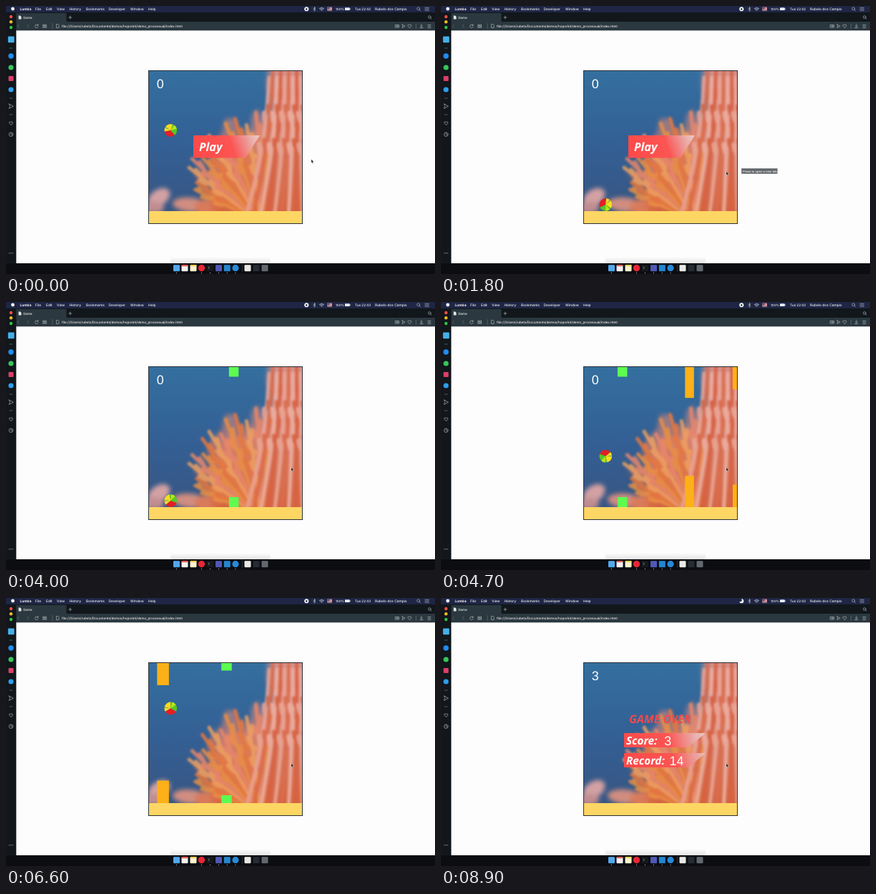
An HTML page that plays this animation: 600 by 375 pixels, repeating every 9 s.

```html
<!DOCTYPE html>
<html lang="en">
<head>
<meta charset="utf-8">
<title>Game</title>
<style>
html, body { margin: 0; width: 100%; height: 100%; overflow: hidden; background: #fdfdfd; }
svg { display: block; width: 600px; height: 375px; }
text { font-family: Inter, Roboto, sans-serif; font-weight: 500; text-rendering: geometricPrecision; white-space: pre; }
.num { font: 17.9px "Liberation Sans", Arial, sans-serif; fill: #fff; }
.label { font: italic 700 15.3px "Open Sans", "Noto Sans", sans-serif; fill: #fff; }
.line { fill: none; stroke: #a9b2b8; stroke-width: .7; stroke-linecap: round; stroke-linejoin: round; }
</style>
</head>
<body>
<svg id="stage" viewBox="0 0 600 375" xmlns="http://www.w3.org/2000/svg">
  <defs>
    <linearGradient id="sea" x2="0" y2="1">
      <stop stop-color="#346f9f"/><stop offset=".5" stop-color="#335f94"/><stop offset="1" stop-color="#39547f"/>
    </linearGradient>
    <linearGradient id="ribbon" x2="1" y2="-.12">
      <stop stop-color="#fe4b4a"/><stop offset=".52" stop-color="#fb5553"/>
      <stop offset=".8" stop-color="#eba5a5" stop-opacity=".92"/><stop offset="1" stop-color="#eadede" stop-opacity=".85"/>
    </linearGradient>
    <linearGradient id="haze" x2="0" y2="1">
      <stop stop-color="#000" stop-opacity="0"/><stop offset="1" stop-color="#000" stop-opacity=".1"/>
    </linearGradient>
    <linearGradient id="flesh" x2="0" y2="1">
      <stop stop-color="#d8958f"/><stop offset=".45" stop-color="#da8573"/><stop offset="1" stop-color="#d9653c"/>
    </linearGradient>
    <filter id="soft" x="-20%" y="-20%" width="140%" height="140%"><feGaussianBlur stdDeviation="3.2"/></filter>
    <filter id="mild" x="-10%" y="-10%" width="120%" height="120%"><feGaussianBlur stdDeviation="1.5"/></filter>
    <clipPath id="frame"><rect x="200" y="91" width="214" height="213"/></clipPath>
  </defs>
  <rect width="600" height="375" fill="#fdfdfd"/>
  <rect x="230" y="351" width="140" height="9" rx="3" fill="url(#haze)"/>
  <g id="chrome"></g>
  <g clip-path="url(#frame)">
    <rect x="200" y="90" width="215" height="215" fill="url(#sea)"/>
    <g id="photo"></g>
    <rect x="200" y="287" width="215" height="18" fill="#fed663"/>
    <text id="score" class="num" x="210.8" y="114.5"></text>
    <g id="blocks"></g>
    <g id="ball"></g>
  </g>
  <rect x="199.5" y="90.5" width="215" height="214" fill="none" stroke="#2c3038"/>
  <g id="play">
    <path d="M262 181H355L335 212.5H262Z" fill="url(#ribbon)"/>
    <text class="label" x="270" y="203" style="font-size:16.4px">Play</text>
  </g>
  <g id="over">
    <text class="label" x="263" y="174.5" style="font-size:15.8px;fill:#f04a4c">GAME OVER</text>
    <path d="M256 189H370L346 209H256ZM256 217H370L346 237H256Z" fill="url(#ribbon)"/>
    <text class="label" x="259" y="205">Score:</text>
    <text class="label" x="259" y="233">Record:</text>
    <text class="num" x="312.3" y="205.5">3</text>
    <text class="num" x="319.6" y="234">14</text>
  </g>
  <g id="tip">
    <rect x="420.3" y="227.3" width="50" height="7.4" fill="#62666a" stroke="#85898c" stroke-width=".5"/>
    <text x="422.3" y="232.6" font-size="4.15" fill="#fff">Press to open a new tab</text>
  </g>
  <path id="cursor" d="M0 0V5L1.1 4.1 1.9 6 2.8 5.6 2 3.8H3.5Z" fill="#111" stroke="#fff" stroke-width=".35"/>
</svg>
<script>
const $ = id => document.getElementById(id);
const rect = (x, y, w, h, fill, rx = 0) => `<rect x="${x}" y="${y}" width="${w}" height="${h}" rx="${rx}" fill="${fill}"/>`;
const disc = (x, y, r, fill) => `<circle cx="${x}" cy="${y}" r="${r}" fill="${fill}"/>`;
const line = (d, extra = '') => `<path class="line" d="${d}" ${extra}/>`;
const text = (x, y, s, size = 4.8, extra = '') => `<text x="${x}" y="${y}" font-size="${size}" fill="#f2f4f5" ${extra}>${s}</text>`;
const heart = (x, y) => line(`M${x} ${y + 2.4}L${x - 2.5} ${y - .2}C${x - 2.8} ${y - 2.6} ${x - .6} ${y - 2.6} ${x} ${y - 1}C${x + .6} ${y - 2.6} ${x + 2.8} ${y - 2.6} ${x + 2.5} ${y - .2}Z`);
const ring = (x, y, r) => `<circle class="line" cx="${x}" cy="${y}" r="${r}"/>`;

function drawMenu() {
  const items = [['File', 41], ['Edit', 56], ['View', 71], ['History', 88.5], ['Bookmarks', 112],
    ['Developer', 143.5], ['Window', 174], ['Help', 199]];
  const flag = rect(449.5, 1.7, 6.5, 4.8, '#e9e4e4') + [1.7, 3.4, 5.1].map(y => rect(449.5, y, 6.5, .9, '#c8434b')).join('') +
    rect(449.5, 1.7, 3, 2.6, '#3b4d8c');
  return rect(0, 0, 600, 9, '#1f2645') + disc(9.5, 4, 2.4, '#f2f2f2') +
    text(19.5, 5.8, 'Lumba', 4.8, 'style="font-weight:700"') +
    items.map(([s, x]) => text(x, 5.8, s)).join('') +
    disc(420.3, 4.3, 3, '#fff') + '<g id="rec"></g>' +
    line('M431.5 1.5V7M429.8 3L433 5.4 431.5 7M429.8 5.4L433 3 431.5 1.5') +
    line('M438.5 3.5Q441.5 1 444.5 3.5M439.7 5Q441.5 3.4 443.3 5M441.4 6.3H441.6', 'style="stroke:#fff"') + flag +
    text(461, 5.8, '100%', 4.4) + rect(474, 2.3, 6.8, 3.8, '#e9ecee', .7) + rect(481.1, 3.4, .7, 1.6, '#e9ecee') +
    '<text id="clock" x="488" y="5.8" font-size="4.6" fill="#f2f4f5"></text>' +
    text(516, 5.8, 'Rubelo dos Campis', 4.85) + ring(576.7, 3.7, 1.9) + line('M578.2 5.2L579.8 6.8') +
    line('M586 2.3H591.5M586 4.3H591.5M586 6.3H591.5');
}

function drawBars() {
  return rect(0, 9, 600, 13, '#11171b') + rect(14, 10, 70.5, 13, '#2b383f', 1) + rect(14, 22, 586, 12.3, '#2b383f') +
    rect(0, 9, 14.3, 351, '#12171b') +
    `<path d="M17.6 13.5H20L21.4 15V18.5H17.6Z" fill="#e5e9eb"/>` + text(24, 17.7, 'Game', 4.5) +
    line('M87.8 16H91.8M89.8 14V18') + ring(592.3, 15.5, 1.8) + line('M593.7 16.9L595 18.2') +
    line('M18 26L15.8 28 18 30M30 26L32.2 28 30 30', 'opacity=".45"') +
    line('M44.6 26.8A2.3 2.3 0 1 0 45 29M45 25.6V27.2H43.4') +
    line('M52 26.2H53.6V27.6H52ZM55 26.2H56.6V27.6H55ZM52 28.8H53.6V30.2H52ZM55 28.8H56.6V30.2H55Z') +
    line('M65 24.5V31.5M573.5 25V31.5', 'opacity=".45"') + line('M70.8 25.5H73L74 26.6V30.5H70.8Z') +
    text(78, 29.9, 'file:///Users/rubelo/Documents/demos/hoporbit/demo_processual/index.html', 4.55) +
    line('M544.7 26.5H549.7V30H544.7Z') + ring(547.2, 28.2, .9) +
    line('M554 25.8L558.3 28.2 554 30.5 554.8 28.2Z') + heart(564.4, 28.1) +
    line('M581 25.5V29M579.6 27.8L581 29.2 582.4 27.8M578.8 30.5H583.2M590 26.4H594M590 28.4H594M590 30.4H594');
}

function drawSide() {
  const dots = [[15, 2.2, '#fb4f49'], [22.3, 2.2, '#f8ba2f'], [30, 2.2, '#31c646'],
    [70, 3.7, '#258cf0'], [86, 3.6, '#38c65a'], [117, 3.6, '#2f9deb']];
  return dots.map(([y, r, c]) => disc(7, y, r, c)).join('') + rect(2.8, 42.5, 8.8, 8.8, '#45afe9', 1.2) +
    rect(3.5, 98, 7, 7, '#dc3e68', 1) + line('M5 59H9M5 129H9M5 152H9', 'opacity=".6"') +
    line('M4.3 137L10.3 140.3 4.3 143.5 5.4 140.3Z') + heart(7, 164) + ring(7, 179.7, 2.8) + line('M7 178V179.8L8.3 180.4') +
    [4.8, 7, 9.2].map(x => disc(x, 345.8, .6, '#c5cbd0')).join('');
}

function drawDock() {
  const squares = [[238.5, '#51a8ec'], [250, '#f1f1f2'], [262, '#fbf3cf'], [285.5, '#16191c'],
    [297.5, '#5059b5'], [309.3, '#2387cf'], [338, '#e9e9e4'], [350, '#252a33'], [362, '#62686d']];
  return rect(0, 360, 600, 15, '#0b0d11') +
    squares.map(([x, c]) => rect(x - 4.5, 362.2, 9, 9, c, 1.2)).join('') +
    disc(273.5, 366.7, 4.7, '#e62835') + disc(321, 366.7, 4.6, '#2789d8') +
    rect(246, 362.2, 8, 2, '#e34b48') + rect(258, 362.2, 8.5, 2, '#f4cc4d') + rect(330, 362, .5, 10, '#555') +
    line('M283 365L284.5 366.3 283 367.6') +
    [238.5, 273.5, 285.5, 297.5, 309.3, 321].map(x => disc(x, 373.5, .6, '#d4d7da')).join('');
}

// A curved coral arm with twigs on alternating sides.
function arm(x0, y0, x1, y1, bend, tone, width, twigs) {
  const mx = (x0 + x1) / 2 + bend, my = (y0 + y1) / 2;
  const a = Math.atan2(y1 - y0, x1 - x0);
  let d = `M${x0} ${y0}Q${mx} ${my} ${x1} ${y1}`;
  for (let k = 0; k < twigs; k++) {
    const u = .45 + .45 * k / twigs, v = 1 - u, b = a + (k % 2 ? .6 : -.6);
    const x = v * v * x0 + 2 * u * v * mx + u * u * x1, y = v * v * y0 + 2 * u * v * my + u * u * y1;
    d += `M${x} ${y}q${Math.cos(b) * 7} ${Math.sin(b) * 7} ${Math.cos(a + (b - a) / 2) * 15} ${Math.sin(a + (b - a) / 2) * 15}`;
  }
  return `<path d="${d}" stroke="${tone}" stroke-width="${width}"/>`;
}

function drawPhoto() {
  const fanTones = ['#e98f45', '#e5783f', '#efa060', '#e7876c'];
  const wallTones = ['#eca797', '#dd6c4b', '#efb1a2', '#d9603f'];
  let arms = '';
  for (let i = 0; i < 13; i++) {
    const u = i / 12, a = (208 + 66 * u) * Math.PI / 180;
    const len = 92 + 62 * Math.sqrt(u) - (i % 3 === 1 ? 14 : 0);
    arms += arm(346 + 12 * u, 296, 346 + 8 * u + Math.cos(a) * len, 300 + Math.sin(a) * len, -6 + 12 * u, fanTones[i % 4], 5, 4);
  }
  for (let i = 0; i < 10; i++) {
    arms += arm(335 + i * 10, 296, 368 + i * 5.5, i % 2 ? 86 : 100, 12 - i * 1.5, wallTones[i % 4], 5.2, 4);
  }
  const lumps = [[214, 268, 17, 11, -35, '#d3a1a3'], [207, 282, 14, 8, 0, '#c18d90'], [257, 278, 24, 10, 5, '#d08d80'], [284, 282, 20, 13, 0, '#d87a5c']]
    .map(([x, y, rx, ry, r, c]) => `<ellipse cx="${x}" cy="${y}" rx="${rx}" ry="${ry}" transform="rotate(${r} ${x} ${y})" fill="${c}"/>`).join('');
  const reef = 'M366 86H420V292H288L284 258 262 236 286 229 281 208 289 190 302 178 306 158 320 157 328 176 341 172 344 152 352 144 361 160 370 138 364 110Z';
  const core = 'M374 86H420V292H294L288 246 296 208 312 184 330 190 346 176 358 176 374 148Z';
  return `<g filter="url(#soft)">${lumps}<path d="${reef}" fill="url(#flesh)" opacity=".6"/><path d="${core}" fill="url(#flesh)" opacity=".9"/></g>` +
    `<g filter="url(#mild)" fill="none" stroke-linecap="round" opacity=".85">${arms}</g>`;
}

function drawBall() {
  const wedge = (from, to, fill) => {
    const p = a => `${8.8 * Math.cos(a * Math.PI / 180)} ${8.8 * Math.sin(a * Math.PI / 180)}`;
    return `<path d="M0 0L${p(from)}A8.8 8.8 0 0 1 ${p(to)}Z" fill="${fill}"/>`;
  };
  return wedge(-60, 60, '#e21f25') + wedge(60, 180, '#f7dd1b') + wedge(180, 300, '#55c722') +
    wedge(94, 104, '#6f9f70') + wedge(195, 235, '#b9e51f');
}

$('chrome').innerHTML = drawMenu() + drawBars() + drawSide() + drawDock();
$('photo').innerHTML = drawPhoto();
$('ball').innerHTML = drawBall();

const LOOP = 9000, STEP = 100, START = 2900, CRASH = 7430;
const FLOOR = 278, GRAVITY = 2062, LIFT = -507;
const jumps = [4450, 4800, 5500, 5771, 6230, 6963];
const spins = [[0, 110], [1800, 575], [3200, 955], [4700, 1340], [5800, 1650], [7500, 2160], [9000, 2590]];
const path = [[200, 427, 214.5], [1100, 399, 231.5]];
// colour, left edge, at time, px per ms, width, height
const blocks = [
  ['#5dfb50', 386, 3200, .0927, 13.5, 14],
  ['#fdb017', 341.3, 4700, .103, 12.5, 43.7],
  ['#fdb017', 408, 4700, .1035, 16.5, 31.5],
  ['#5dfb50', 384, 5800, .1035, 14.5, 11]
];

function lerp(keys, t, col = 1) {
  if (t <= keys[0][0]) return keys[0][col];
  for (let i = 1; i < keys.length; i++) {
    const a = keys[i - 1], b = keys[i];
    if (t <= b[0]) return a[col] + (b[col] - a[col]) * (t - a[0]) / (b[0] - a[0]);
  }
  return keys[keys.length - 1][col];
}

function ballY(t, n = jumps.filter(j => j <= t).length) {
  const s = (t - (n ? jumps[n - 1] : 0)) / 1000;
  const from = n ? ballY(jumps[n - 1], n - 1) : 174;
  const y = from + (n ? LIFT : 485) * s + GRAVITY * s * s / 2;
  return t > CRASH ? y : Math.min(FLOOR, y);
}

const show = (id, on) => $(id).setAttribute('visibility', on ? 'visible' : 'hidden');

function render(t) {
  const playing = t >= START && t < CRASH;
  let score = 0, bars = '';
  for (const [fill, x0, at, speed, w, h] of blocks) {
    const x = x0 - (Math.min(t, CRASH) - at) * speed;
    if (x <= 200) score++;
    if (playing && x < 415 && x > 200 - w) bars += rect(x, 90.5, w, h, fill) + rect(x, 287 - h, w, h, fill);
  }
  $('blocks').innerHTML = bars;
  $('score').textContent = score;
  $('ball').setAttribute('transform', `translate(230.3 ${Math.min(ballY(t), 330)}) rotate(${lerp(spins, t)})`);
  $('cursor').setAttribute('transform', `translate(${lerp(path, t)} ${lerp(path, t, 2)})`);
  $('clock').textContent = t < 4000 ? 'Tue 22:02' : 'Tue 22:03';
  $('rec').innerHTML = t < 8900 ? rect(419.2, 3.2, 2.2, 2.2, '#111', .4) : disc(418.6, 3, 2.2, '#1f2645');
  show('play', t < START);
  show('over', t >= CRASH);
  show('tip', t >= 1500 && t < 2300);
}

const begin = performance.now();
let last = -1;
function tick() {
  const t = Math.floor((performance.now() - begin) % LOOP / STEP) * STEP;
  if (t !== last) render(last = t);
  requestAnimationFrame(tick);
}
tick();
</script>
</body>
</html>
```
